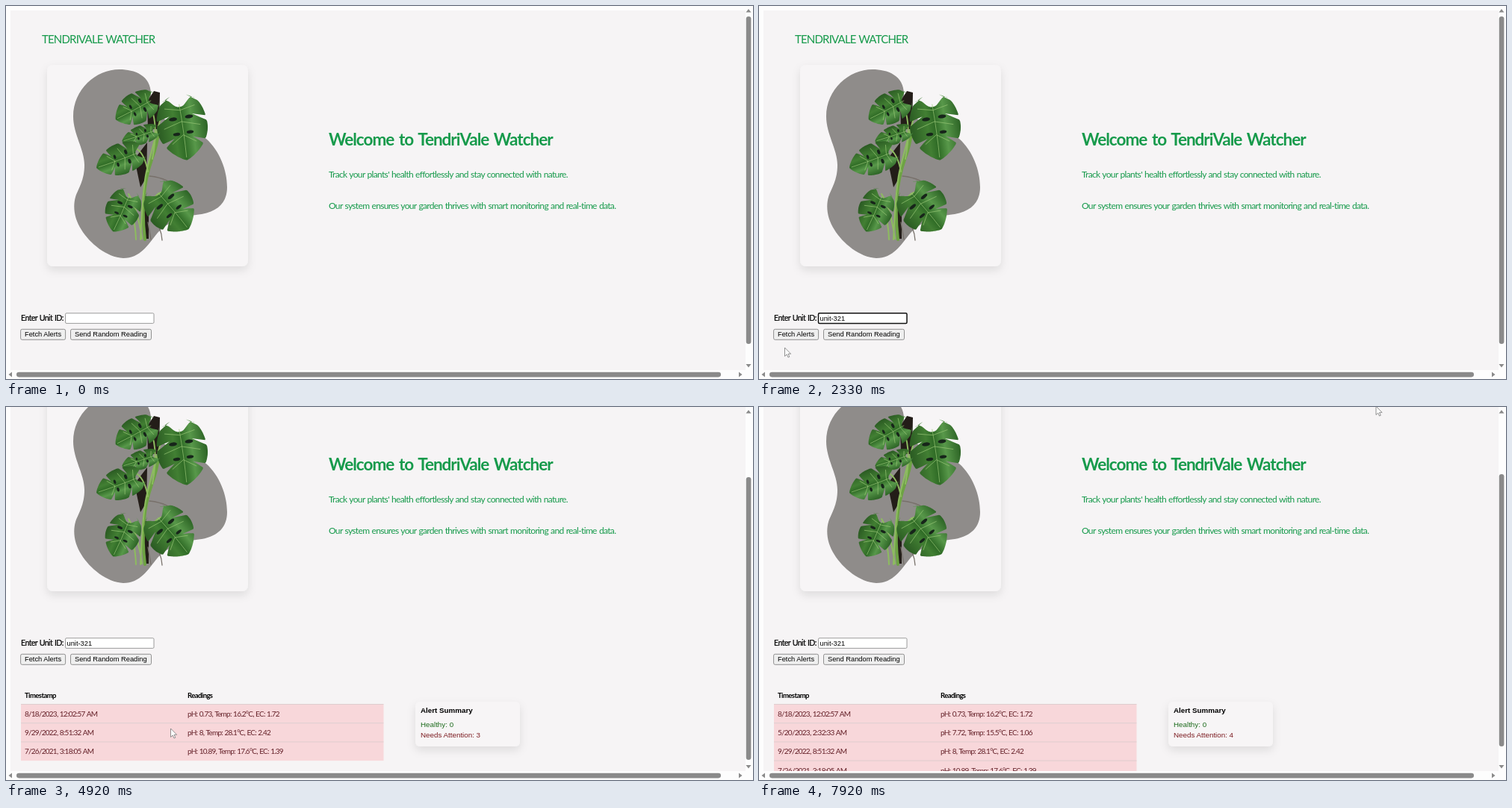
These frames come from a looping animation (1000x500 px, 7940 ms). An HTML page:

```html
<!DOCTYPE html>
<html lang="en">
<head>
<meta charset="utf-8">
<title>Plant monitor</title>
<style>
  html, body { margin: 0; width: 100%; height: 100%; overflow: hidden; background: #fdfdfd; }
  svg { display: block; width: 100%; height: 100%; }
  .hand { font-family: Lato, 'Open Sans', sans-serif; letter-spacing: -.055em; word-spacing: .06em; }
  .title { font-size: 22.5px; font-weight: 700; letter-spacing: -.045em; word-spacing: .1em; }
  .cell { font-size: 10px; letter-spacing: -.075em; fill: #642028; }
  .head { font-size: 9.5px; letter-spacing: -.06em; font-weight: 700; }
  .ui { font-family: 'Liberation Sans', Arial, sans-serif; font-size: 9.3px; }
  .sum { font-size: 9.8px; }
  .green { fill: #169a4b; }
  .vein { fill: none; stroke: #9ac878; stroke-width: .7; vector-effect: non-scaling-stroke; }
  .btn { stroke-width: .8; }
</style>
</head>
<body>
<svg viewBox="0 0 1000 500" preserveAspectRatio="none">
  <defs>
    <clipPath id="view"><rect width="990" height="488"/></clipPath>
    <filter id="shadow" x="-20%" y="-20%" width="140%" height="150%">
      <feDropShadow dx="0" dy="5" stdDeviation="6" flood-color="#000" flood-opacity=".1"/>
    </filter>
    <linearGradient id="leafFill">
      <stop offset="0" stop-color="#2a5a22"/>
      <stop offset=".35" stop-color="#427f33"/>
      <stop offset=".5" stop-color="#2f6b26"/>
      <stop offset=".7" stop-color="#58984a"/>
      <stop offset="1" stop-color="#2c6325"/>
    </linearGradient>
    <g id="leaf">
      <path id="outline" fill="url(#leafFill)"/>
      <path class="vein" d="M0 -.34Q.02 .1 0 .46M0 -.25L.3 -.3M0 -.25L-.3 -.3M0 -.08L.36 0M0 -.08L-.36 0M0 .12L.24 .24M0 .12L-.24 .24"/>
      <g fill="#17251a">
        <ellipse cx=".16" cy="-.14" rx=".08" ry=".028"/>
        <ellipse cx="-.16" cy="-.13" rx=".08" ry=".028"/>
        <ellipse cx=".14" cy=".09" rx=".07" ry=".024"/>
        <ellipse cx="-.13" cy=".1" rx=".07" ry=".024"/>
      </g>
    </g>
  </defs>

  <g clip-path="url(#view)">
    <g id="page">
      <rect x="6" y="6" width="984" height="700" fill="#f6f4f5"/>
      <text class="hand green" x="48" y="50" font-size="15">TENDRIVALE WATCHER</text>

      <rect x="55" y="79" width="269" height="270" rx="8" fill="#f7f5f6" filter="url(#shadow)"/>
      <path fill="#8f8c8a" d="M152 85C172 85 194 93 194 118C194 146 222 160 240 164C250 166 260 172 268 178C286 194 296 220 296 243C296 262 285 275 262 279C238 281 215 290 203 304C190 320 180 338 157 338C135 337 112 318 101 300C92 286 89 270 93 256C97 244 105 234 105 213C105 192 90 172 90 148C90 112 120 85 152 85Z"/>
      <path fill="#231d18" d="M189 128L198 114L206 116L205 165L190 165ZM172 205L189 183L188 230L180 243ZM184 255H191V312H184Z"/>
      <g fill="none" stroke-linecap="round">
        <path stroke="#77706a" stroke-width="1.3" d="M192 228C212 230 224 238 230 246M196 284Q208 296 209 314M190 290L194 313"/>
        <path stroke="#6da343" stroke-width="4" d="M186 313C182 280 183 240 195 206Q203 185 204 168"/>
        <path stroke="#8dbc5f" stroke-width="2" d="M180 313C182 270 184 240 188 222Q198 180 213 130M182 312Q176 270 164 252M190 275Q196 255 207 250M190 222Q186 200 176 192M196 205Q206 150 189 127M174 313Q173 285 165 270"/>
      </g>
      <g id="plant"></g>

      <text class="hand green title" x="432" y="186.500">Welcome to TendriVale Watcher</text>
      <g class="hand green" font-size="12">
        <text x="432" y="230">Track your plants' health effortlessly and stay connected with nature.</text>
        <text x="432" y="272">Our system ensures your garden thrives with smart monitoring and real-time data.</text>
      </g>

      <text class="hand" x="20" y="422" font-size="10.600" stroke="#000" stroke-width=".2">Enter Unit ID:</text>
      <rect id="input" x="79.500" y="411.800" width="118.500" height="13.600" rx="1.500" fill="#fff"/>
      <rect id="caret" x="82" y="413.500" width="1" height="10"/>
      <text id="unit" class="ui" x="81.500" y="422">unit-321</text>
      <rect id="fetch" class="btn" x="19.600" y="433.300" width="60" height="14" rx="2"/>
      <rect id="send" class="btn" x="86.500" y="433.300" width="108" height="14" rx="2"/>
      <text class="ui" x="25" y="443.300">Fetch Alerts</text>
      <text class="ui" x="92" y="443.300">Send Random Reading</text>

      <g id="results">
        <text class="hand head" x="25" y="492">Timestamp</text>
        <text class="hand head" x="243" y="492">Readings</text>
        <g id="rows3"></g>
        <g id="rows4"></g>
        <rect x="548" y="497" width="140" height="60" rx="6" fill="#f7f5f6" filter="url(#shadow)"/>
        <g class="ui">
          <text class="sum" x="555" y="512" font-weight="700">Alert Summary</text>
          <text class="sum" x="555" y="531" fill="#1d6b1d">Healthy: 0</text>
          <text id="needs" class="sum" x="555" y="545" fill="#7d1d22"></text>
        </g>
      </g>
    </g>
  </g>

  <g fill="#8a8a8a">
    <rect id="thumb" x="990.800" width="6.600" rx="3.300"/>
    <rect x="14" y="490.800" width="943" height="6.600" rx="3.300"/>
    <path d="M990.500 8.500L994 4L997.500 8.500ZM990.500 480L994 484.500L997.500 480ZM8 490.500L3.500 494L8 497.500ZM981 490.500L985.500 494L981 497.500Z"/>
  </g>
  <path id="cursor" d="M.5 0V11.500L3.200 9L5 13L6.800 12.200L5 8.300H8.600Z" fill="#fff" stroke="#777" stroke-width=".8" stroke-linejoin="round"/>
</svg>
<script>
const LOOP = 7940;
const $ = id => document.getElementById(id);
const set = (id, attrs) => { for (const k in attrs) $(id).setAttribute(k, attrs[k]); };
const show = (id, on) => set(id, { visibility: on ? 'inherit' : 'hidden' });
const within = (t, a, b) => t >= a && t < b;
const ease = p => { p = Math.min(1, Math.max(0, p)); return p * p * (3 - 2 * p); };

// Heart-shaped leaf with slits cut in from both sides
function leafOutline() {
  const pts = [];
  for (let i = 0; i < 180; i++) {
    const t = i * Math.PI / 90, s = Math.min(t, 2 * Math.PI - t);
    const slit = s > .5 && s < 2.6 ? Math.max(0, Math.cos(9 * s)) ** 14 : 0;
    const taper = s > 1.57 ? 1.6 : .8;
    const x = .5 * Math.sign(Math.sin(t)) * Math.abs(Math.sin(t)) ** taper * (1 - .55 * slit);
    const y = -.5 * Math.cos(t) + .2 * Math.exp(-s * s / .1) - .09 * slit;
    pts.push(x.toFixed(3) + ' ' + y.toFixed(3));
  }
  return 'M' + pts.join('L') + 'Z';
}
set('outline', { d: leafOutline() });

// centre x, centre y, turn, width, length
$('plant').innerHTML = [
  [175, 137, 62, 42, 64], [236, 162, -8, 68, 90], [181, 173, 72, 25, 54],
  [154, 205, 70, 42, 70], [156, 274, 24, 46, 62], [220, 270, -40, 64, 76]
].map(([x, y, a, w, l]) =>
  `<use href="#leaf" transform="translate(${x} ${y}) rotate(${a}) scale(${w} ${l})"/>`).join('');

const readings = [
  ['8/18/2023, 12:02:57 AM', 'pH: 0.73, Temp: 16.2°C, EC: 1.72'],
  ['5/20/2023, 2:32:33 AM', 'pH: 7.72, Temp: 15.5°C, EC: 1.06'],
  ['9/29/2022, 8:51:32 AM', 'pH: 8, Temp: 28.1°C, EC: 2.42'],
  ['7/26/2021, 3:18:05 AM', 'pH: 10.89, Temp: 17.6°C, EC: 1.39']
];
const tableRows = list => list.map(([time, text], i) => {
  const y = 500.5 + i * 25.2;
  return `<rect x="20" y="${y}" width="485.500" height="25.200" fill="#f8d7da"/>
    <path d="M20 ${y}H505.500" stroke="#d9c8ca" stroke-width=".8"/>
    <text class="hand cell" x="25" y="${y + 16.5}">${time}</text>
    <text class="hand cell" x="243" y="${y + 16.5}">${text}</text>`;
}).join('');
$('rows3').innerHTML = tableRows(readings.filter((r, i) => i !== 1));
$('rows4').innerHTML = tableRows(readings);

// time, x, y of the pointer tip
const path = [
  [1990, 110, 424], [2330, 34, 458], [2720, 48, 439], [3190, 48, 439], [3300, 220, 431],
  [5080, 220, 431], [5810, 146, 337], [6220, 146, 337], [6340, 396, 216.5], [6560, 826, -20],
  [7780, 826, -16], [7910, 825.5, -1], [LOOP, 825.5, -1]
];
function pointer(t) {
  const i = path.findIndex(k => k[0] > t);
  if (i < 1) return [-50, -50];
  const [a, b] = [path[i - 1], path[i]];
  const p = (t - a[0]) / (b[0] - a[0]), q = t > 6220 ? p : ease(p);
  return [a[1] + (b[1] - a[1]) * q, a[2] + (b[2] - a[2]) * q];
}

function draw(t) {
  const loaded = t >= 3190, added = t >= 7460;
  const scroll = t < 3710 ? 0 : 3 + 99 * ease((t - 3725) / 150);
  set('page', { transform: `translate(0 ${-scroll})` });

  const [height, rate] = added ? [365, .745] : loaded ? [379, .784] : [439, 0];
  set('thumb', { y: 14 + scroll * rate, height });

  const focus = within(t, 1030, 2900);
  set('input', { stroke: focus ? '#111' : '#858585', 'stroke-width': focus ? 1.5 : .8 });
  show('caret', within(t, 1030, 1450));
  show('unit', t >= 1710);

  const fill = on => ({ fill: on ? '#e2e2e2' : '#efefef', stroke: on ? '#555' : '#777' });
  set('fetch', fill(within(t, 2600, 3190)));
  set('send', fill(within(t, 5600, 7460)));

  show('results', loaded);
  set('rows3', { display: added ? 'none' : 'inline' });
  set('rows4', { display: added ? 'inline' : 'none' });
  $('needs').textContent = 'Needs Attention: ' + (added ? 4 : 3);

  const [x, y] = pointer(t);
  set('cursor', { transform: `translate(${x} ${y})` });
}

const start = performance.now();
function tick() {
  draw((performance.now() - start) % LOOP);
  requestAnimationFrame(tick);
}
tick();
</script>
</body>
</html>
```
